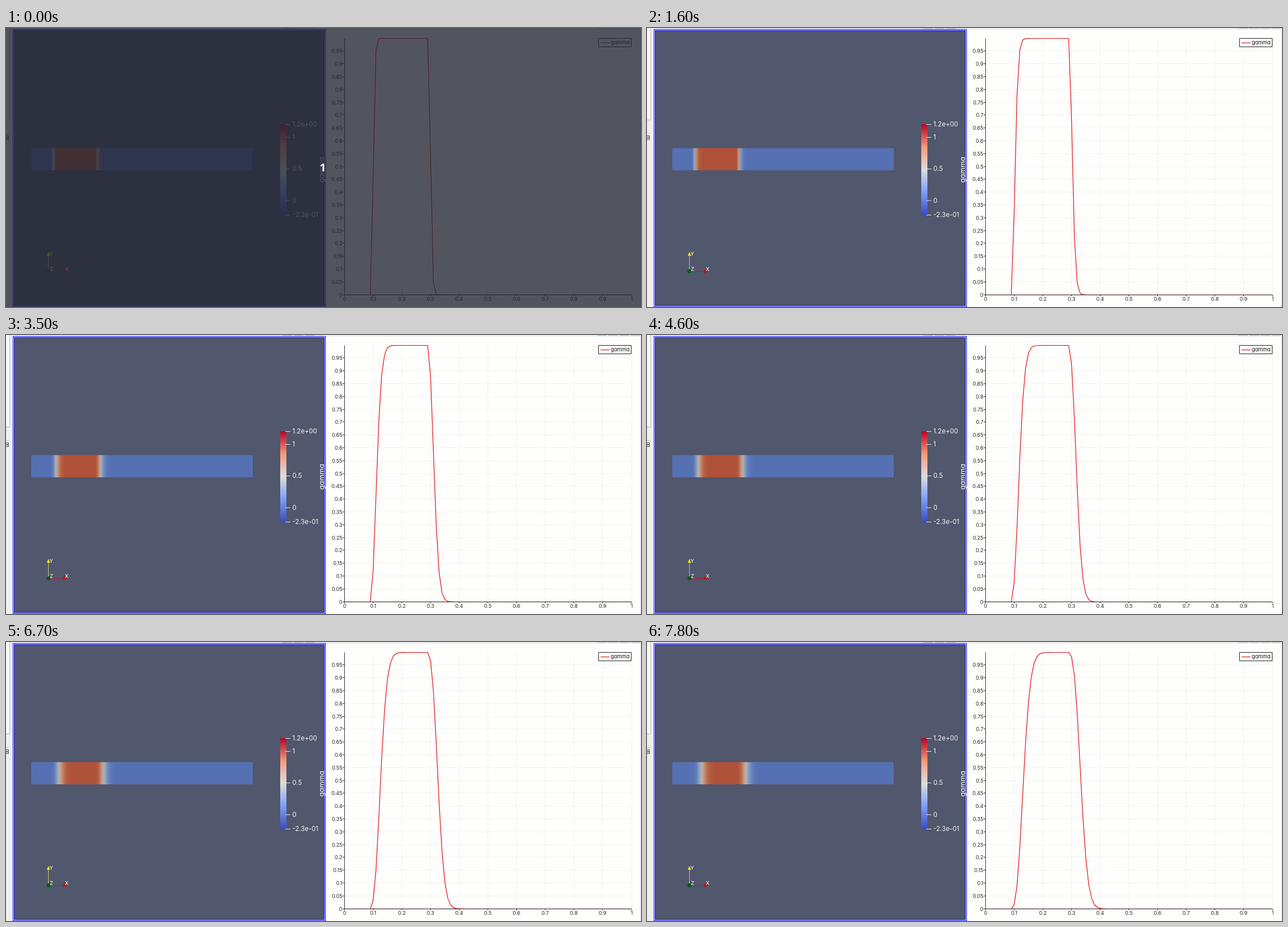
Recreate the animation shown at these times as an HTML page with a canvas. Size 1130 px wide and 496 px high, loop 8000 ms.

```html
<!DOCTYPE html>
<html lang="en">
<head>
<meta charset="utf-8">
<title>Advection of gamma</title>
<style>
  html, body { margin: 0; width: 1130px; height: 496px; overflow: hidden; background: #efefef; }
  canvas, div, span { position: absolute; left: 0; top: 0; }
  span { font-family: Inter, "Open Sans", sans-serif; font-feature-settings: "cv11"; line-height: 16px; white-space: nowrap; }
  #legend { left: 1076px; top: 18px; font-size: 9.4px; color: #111; }
  #title { left: 562px; top: 251.5px; font-size: 12.8px; color: #fff; transform: translate(-50%, -50%) rotate(-90deg); }
  #dim { width: 1130px; height: 496px; background: rgba(36, 39, 51, .785); }
  #count { left: 558px; top: 236px; width: 10px; height: 24px; overflow: hidden; color: #fff;
           font: bold 20px/24px "Open Sans", sans-serif; }
</style>
</head>
<body>
<canvas id="stage" width="1130" height="496"></canvas>
<span id="legend">gamma</span>
<span id="title">gamma</span>
<div id="dim"><span id="count">1</span></div>
<script>
const ctx = document.getElementById('stage').getContext('2d');
const dim = document.getElementById('dim');
const LOOP = 8000, DIM_TIME = 100, CELLS = 100;
const STEP_TIMES = [12, 13, 14, 16, 19, 21, 22, 23, 25, 27, 28, 31, 34, 35, 39, 41, 42, 44, 46,
  49, 52, 53, 55, 57, 61, 64, 67, 69, 70, 72, 74, 77, 78].map(t => t * 100);
const PLOT = { x: 602.5, y: 474.5, w: 511, h: 456 };
const BAR = { x: 45, y: 213.5, w: 394, h: 39.5 };
const COOL_WARM = ['#3b4cc0', '#7b9ff9', '#dddddd', '#f49a7b', '#b40426'];
const SHADED = [[86, 112, 180], [130, 158, 198], [188, 185, 178], [200, 142, 110], [176, 81, 57]];

// A sharp front carried by upwind transport spreads as a cumulative Poisson curve.
function front(shift) {
  const cells = [];
  let term = Math.exp(-shift), sum = 0;
  for (let i = 0; i < CELLS; i++) {
    sum += term;
    cells.push(sum);
    term *= shift / (i + 1);
  }
  return cells;
}

// Values at the cell corners after a number of time steps of slowly growing size.
function profile(step) {
  const cells = front(0.09 * step + 0.0003 * step * step);
  const cell = i => (cells[i - 10] ?? 0) - (cells[i - 30] ?? 0);
  return Array.from({ length: CELLS + 1 }, (_, i) => (cell(i - 1) + cell(Math.min(i, CELLS - 1))) / 2);
}

function rect(x, y, w, h, color) {
  ctx.fillStyle = color;
  ctx.fillRect(x, y, w, h);
}

function trace(points) {
  ctx.beginPath();
  points.forEach(([x, y]) => ctx.lineTo(x, y));
}

function path(points, color, width = 1) {
  trace(points);
  ctx.strokeStyle = color;
  ctx.lineWidth = width;
  ctx.stroke();
}

function shape(points, color) {
  trace(points);
  ctx.fillStyle = color;
  ctx.fill();
}

function label(text, x, y, size, color, align = 'left') {
  ctx.font = `${size}px Inter, "Open Sans", sans-serif`;
  ctx.textAlign = align;
  ctx.fillStyle = color;
  ctx.fillText(text, x, y + size * 0.364);
}

function shade(value) {
  const pos = Math.min(Math.max(value, 0), 1) * 4;
  const i = Math.min(Math.floor(pos), 3);
  return `rgb(${SHADED[i].map((c, k) => Math.round(c + (SHADED[i + 1][k] - c) * (pos - i)))})`;
}

function drawWindow() {
  rect(0, 0, 1130, 496, '#efefef');
  rect(0, 0, 6, 163, '#f8f8f8');
  path([[0, 163.5], [6.5, 163.5], [6.5, 0]], '#b8b8b8');
  path([[0, 187.5], [6, 187.5]], '#cccccc');
  ctx.strokeStyle = '#555';
  ctx.strokeRect(-0.5, 191.5, 5, 7);
  path([[0, 193], [4, 197]], '#444');
  path([[4, 193], [0, 197]], '#444');
  for (const x of [492, 512, 532, 1052, 1072, 1092, 1112]) rect(x, 0, 17, 1.5, '#c9c9c9');
}

function drawScale() {
  const gradient = ctx.createLinearGradient(0, 332, 0, 171);
  COOL_WARM.forEach((color, i) => gradient.addColorStop(i / 4, color));
  rect(488, 171, 11, 162, gradient);
  const marks = [['1.2e+00', 171.5], ['1', 194.5], ['0.5', 250.5], ['0', 307], ['-2.3e-01', 332.5]];
  for (const [text, y] of marks) {
    path([[497, y], [506, y]], '#e4e4e8');
    label(text, 509.5, y - 0.5, 11.6, '#f4f4f4');
  }
}

function drawTriad() {
  path([[75.5, 432], [75.5, 404]], '#c6c67a');
  shape([[75.5, 398], [78.5, 405], [72.5, 405]], '#f0e800');
  path([[76, 432.5], [104, 432.5]], '#b81820');
  shape([[110, 432.5], [102, 429.5], [102, 435.5]], '#e00000');
  ctx.beginPath();
  ctx.arc(75.5, 432.5, 3.6, 0, 7);
  ctx.fillStyle = '#0a5a14';
  ctx.fill();
  label('Y', 80.5, 402, 9.5, '#fff', 'center');
  label('Z', 81, 428.5, 9.5, '#fff', 'center');
  label('X', 108, 429, 9.5, '#fff', 'center');
}

function drawField(values) {
  const gradient = ctx.createLinearGradient(BAR.x, 0, BAR.x + BAR.w, 0);
  values.forEach((v, i) => gradient.addColorStop(i / CELLS, shade(v)));
  ctx.beginPath();
  ctx.roundRect(BAR.x, BAR.y, BAR.w, BAR.h, 1.5);
  ctx.fillStyle = gradient;
  ctx.fill();
}

function drawView(values) {
  const layers = ['#0000ff', '#ffffff', '#0000ff', '#51576c'];
  layers.forEach((color, i) => rect(12 + i, 2 + i, 557 - 2 * i, 494 - 2 * i, color));
  drawField(values);
  drawScale();
  drawTriad();
}

function drawChart(values) {
  const { x: left, y: base, w, h } = PLOT;
  const right = left + w - 0.5, top = base - h;
  rect(571, 3, 557, 493, '#fefefd');
  for (let i = 1; i <= 10; i++) {
    const x = Math.round(left + i * w / 10) - 0.5;
    path([[x, top], [x, base]], '#f2f2f2');
  }
  for (let i = 1; i < 20; i++) {
    const y = Math.round(base - i * h / 20) - 0.5;
    path([[left, y], [right, y]], '#f2f2f2');
  }

  ctx.lineJoin = 'round';
  path(values.map((v, i) => [left + i * w / CELLS - 0.3, base - v * h]), '#e00d14', 1.2);
  path([[left - 0.5, base], [right, base]], '#2a1212');
  path([[left, top], [left, base]], '#333');

  for (let i = 0; i < 20; i++) {
    const y = Math.round(base - i * h / 20) - 0.5;
    path([[599, y], [602, y]], '#333');
    label(String(i / 20), 598.5, y, 9, '#222', 'right');
  }
  for (let i = 0; i <= 10; i++) {
    const x = Math.round(left + i * w / 10) - 0.5;
    path([[x, 475], [x, 477]], '#333');
    label(String(i / 10), x, 482, 9, '#222', 'center');
  }

  rect(1054, 18, 59, 16, '#fff');
  ctx.strokeStyle = '#222';
  ctx.lineWidth = 1;
  ctx.strokeRect(1054.5, 18.5, 58, 15);
  path([[1058, 26.5], [1074, 26.5]], '#d81818', 1.2);
}

function render(now) {
  const time = now % LOOP;
  const values = profile(1 + STEP_TIMES.filter(t => t <= time).length);
  drawWindow();
  drawView(values);
  drawChart(values);
  dim.style.visibility = time < DIM_TIME ? 'visible' : 'hidden';
}

function tick() {
  render(performance.now());
  requestAnimationFrame(tick);
}
tick();
</script>
</body>
</html>
```
